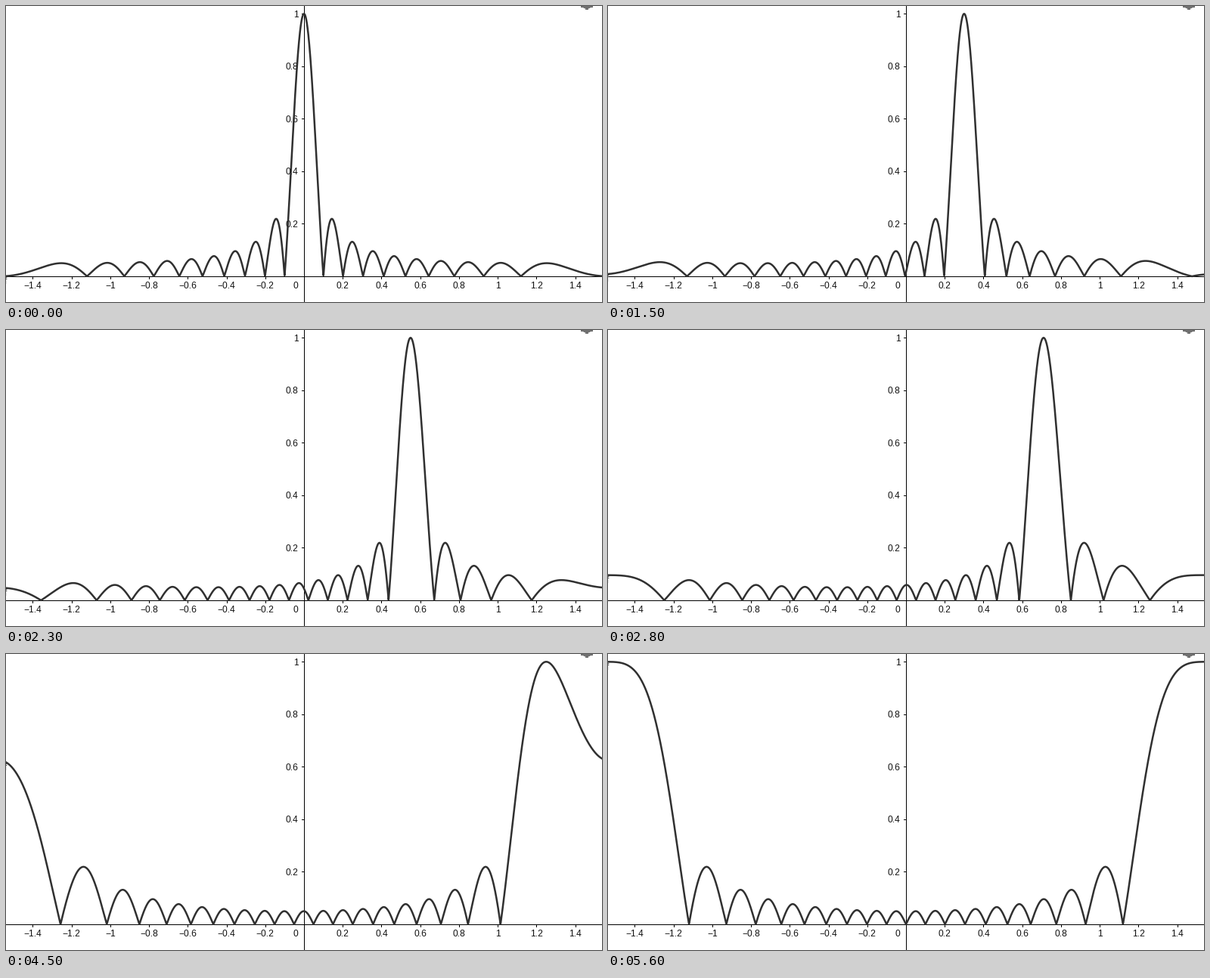
Recreate the animation shown at these times as a matplotlib script. Size 788 by 392 pixels, loop 5.8 s.

```python
import numpy as np
import matplotlib.pyplot as plt
from matplotlib.animation import FuncAnimation
from matplotlib.patches import Polygon

W, H, DPI = 788, 392, 100
PT = 72 / DPI                  # points per pixel
X0, Y0 = 394, 358              # origin in pixels
SX, SY = 256.2, 347.7          # pixels per unit
ELEMENTS = 20
FRAMES, HOLD = 58, 5           # 100 ms frames, still ones at the start
INK = "#303030"

plt.rcParams["font.family"] = "Liberation Sans"

fig = plt.figure(figsize=(W / DPI, H / DPI), dpi=DPI, facecolor="white")
ax = fig.add_axes([0, 0, 1, 1])
ax.set_xlim(0, W)
ax.set_ylim(H, 0)
ax.axis("off")


def line(xs, ys):
    ax.plot(xs, ys, color="black", lw=PT, solid_capstyle="butt",
            snap=False, zorder=1)


def center(v):
    """Middle of the pixel that holds a rounded coordinate."""
    return np.round(v) + 0.5


def label(x, y, value, ha):
    text = f"{value:g}".replace("-", "\u2212")
    ax.text(x, y, text, size=12 * PT, ha=ha, va="baseline", color="#111111", zorder=2)


def draw_axes():
    line([0, W], [center(Y0)] * 2)
    line([center(X0)] * 2, [0, H])
    for i in range(-7, 8):
        if i == 0:
            continue
        x = X0 + SX * i / 5
        line([center(x)] * 2, [Y0, Y0 + 4])
        label(x, 374.3, i / 5, "center")
    for i in range(1, 6):
        y = Y0 - SY * i / 5
        line([X0 - 3, X0], [center(y)] * 2)
        label(386.7, y + 4.4, i / 5, "right")
    label(386.7, 374.3, 0, "right")


def draw_gear():
    half = [(8, 0), (8, 2), (4.5, 2.2), (4, 3), (2, 3.3), (2, 5)]
    pts = [(768 + dx, y) for dx, y in half]
    pts += [(768 - dx, y) for dx, y in reversed(half)]
    ax.add_patch(Polygon(pts, closed=True, fc="#707070", ec="none"))


def array_factor(theta, steer):
    """Normalised response of a half-wavelength spaced line array."""
    u = np.pi / 2 * (np.sin(theta) - np.sin(steer)) + 1e-9
    return np.abs(np.sin(ELEMENTS * u) / (ELEMENTS * np.sin(u)))


def steer_at(frame):
    step = max(0, frame - HOLD)
    angle = np.interp(step, [0, 5, 14, 23, 32, 40, 51],
                      [0, 0.14, 0.43, 0.71, 1.01, 1.25, 1.57])
    return round(float(angle), 2)


draw_axes()
draw_gear()

px = np.linspace(-2, W + 2, 3169)
theta = (px - X0) / SX
curve, = ax.plot([], [], color=INK, lw=2.5 * PT, solid_joinstyle="round", zorder=3)
name = ax.text(-2.6, 0, "f", size=12 * PT, color=INK, va="baseline", zorder=3)


def update(frame):
    steer = steer_at(frame)
    curve.set_data(px, Y0 - SY * array_factor(theta, steer))
    edge = Y0 - SY * array_factor(-X0 / SX, steer)
    name.set_y(edge + 10.5)
    return curve, name


anim = FuncAnimation(fig, update, frames=FRAMES, interval=100, repeat=True,
                     repeat_delay=0, blit=False)
plt.show()
```
